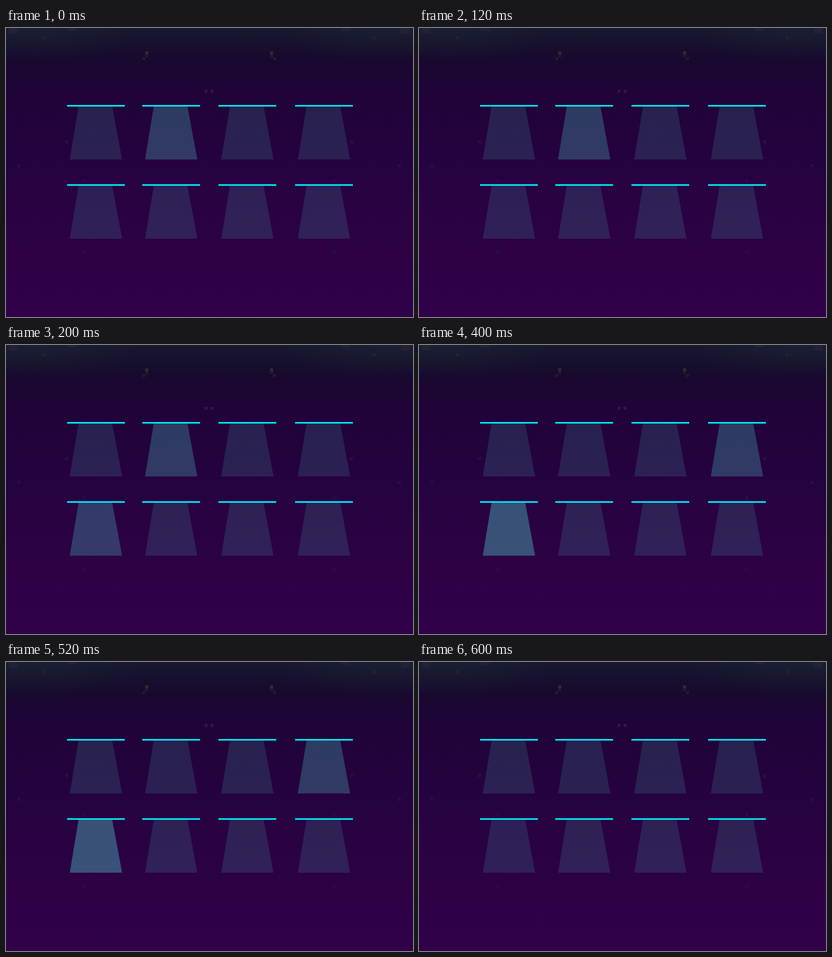
Animation of 887x631 px, one loop 0.8 s. Source, as an HTML page without scripts:

```html
<!DOCTYPE html>
<html lang="en">
<head>
<meta charset="utf-8">
<title>Spotlights</title>
<style>
  html, body { margin: 0; width: 100%; height: 100%; overflow: hidden; background: #2b0244; }
  svg { display: block; width: 100%; height: 100%; }
  .beam { fill: rgb(88, 235, 225); opacity: .13; }
  .bar { fill: #00f6ff; }
  .b { animation: .8s step-end infinite; }
  .early .b { animation-name: early; }
  .late .b { animation-name: late; }
  .rise .b { animation-name: rise; }
  @keyframes early { 0% { opacity: .245; } 50%, 100% { opacity: .13; } }
  @keyframes late { 0% { opacity: .13; } 50% { opacity: .245; } 75%, 100% { opacity: .13; } }
  @keyframes rise {
    0% { opacity: .13; }
    25% { opacity: .245; }
    50% { opacity: .345; }
    75%, 100% { opacity: .13; }
  }
</style>
</head>
<body>
<svg viewBox="0 0 887 631" preserveAspectRatio="none">
  <defs>
    <linearGradient id="night" x2="0" y2="1">
      <stop offset="0" stop-color="#171831"/>
      <stop offset=".05" stop-color="#17112e"/>
      <stop offset=".11" stop-color="#18092e"/>
      <stop offset=".2" stop-color="#1f0438"/>
      <stop offset=".38" stop-color="#24023e"/>
      <stop offset=".65" stop-color="#2a0243"/>
      <stop offset="1" stop-color="#300148"/>
    </linearGradient>
    <radialGradient id="haze">
      <stop offset="0" stop-color="#1b2434" stop-opacity=".6"/>
      <stop offset="1" stop-color="#1b2434" stop-opacity="0"/>
    </radialGradient>
    <g id="lamp">
      <path class="beam b" d="M158 171.4H231.5L253 287H139Z"/>
      <rect class="bar" x="133" y="168.2" width="126" height="3.3"/>
    </g>
    <g id="specks">
      <path fill="#372832" d="M303.500 51h6.500v6.500h-6.500z"/>
      <path fill="#241a32" d="M303.500 57.500h6.500v6h-6.500zM297 64h6.500v6H297z"/>
      <path fill="#2d1942" d="M433 135h6.500v6.500H433z"/>
      <path fill="#2c0e43" d="M25 297h6.500v6.500H25zM129 245h6.500v6.500H129z"/>
      <path fill="#2e0947" d="M168 330h6.500v6.500H168zM168 486h6.500v6.500H168z"/>
      <path fill="#222235" d="M80 18h6.500v6.500H80zM135 0h19v6h-19zM6 0h19v12H6z"/>
    </g>
  </defs>

  <rect width="887" height="631" fill="url(#night)"/>
  <ellipse cx="60" cy="0" rx="230" ry="75" fill="url(#haze)"/>
  <ellipse cx="827" cy="0" rx="230" ry="75" fill="url(#haze)"/>
  <use href="#specks"/>
  <use href="#specks" transform="matrix(-1 0 0 1 885.500 0)"/>

  <use href="#lamp"/>
  <g class="early" transform="translate(164)">
    <path class="beam b" d="M158 171.4H231.5L253 287H139Z"/>
    <rect class="bar" x="133" y="168.2" width="126" height="3.3"/>
  </g>
  <use href="#lamp" x="330"/>
  <g class="late" transform="translate(497)">
    <path class="beam b" d="M158 171.4H231.5L253 287H139Z"/>
    <rect class="bar" x="133" y="168.2" width="126" height="3.3"/>
  </g>

  <g transform="translate(0 173)">
    <g class="rise">
      <path class="beam b" d="M158 171.4H231.5L253 287H139Z"/>
      <rect class="bar" x="133" y="168.2" width="126" height="3.3"/>
    </g>
    <use href="#lamp" x="164"/>
    <use href="#lamp" x="330"/>
    <use href="#lamp" x="497"/>
  </g>
</svg>
</body>
</html>
```
